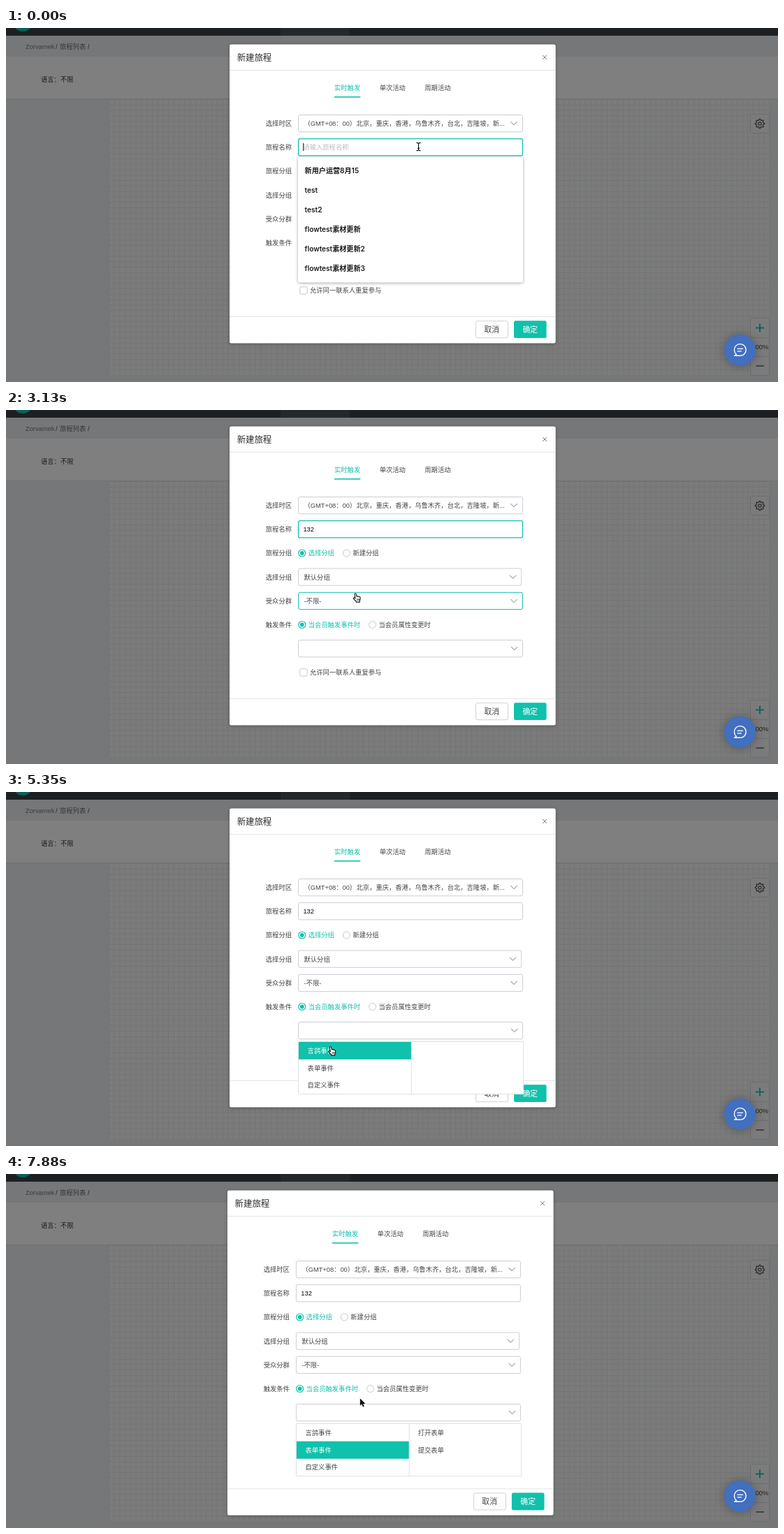
Recreate the animation shown at these times as an HTML page with a canvas. Size 1105x507 px, loop 8000 ms.

```html
<!DOCTYPE html>
<html lang="zh-CN">
<head>
<meta charset="utf-8">
<title>新建旅程</title>
<style>
html, body { margin: 0; width: 100%; height: 100%; overflow: hidden; background: #777879; }
canvas { display: block; width: 100vw; height: 100vh; }
</style>
</head>
<body>
<canvas id="stage"></canvas>
<script>
const W = 1105, H = 507, LOOP = 8000;
const TEAL = '#10c1ab', BORDER = '#c9ced6', INK = '#454545';
const CJK = '"Noto Sans CJK SC", "Noto Sans CJK", "Noto Sans CJK JP", sans-serif';
const UI = '"Liberation Sans", ' + CJK;
const MENU = 'Inter, ' + CJK;

const canvas = document.getElementById('stage');
const ctx = canvas.getContext('2d');

// Steps are [start time, value...]; the last one already begun applies.
const at = (steps, t) => steps.filter(s => s[0] <= t).pop();

const NAME = [[0, ''], [740, '1'], [890, '13'], [2380, '132']];
const CARET = [[0, 1], [290, 0], [740, 1], [1330, 0], [1930, 1], [2980, 0], [3430, 1], [4010, 0]];
const POINTER = [
  [0, beam, 590.5, 170], [2680, beam, 576, 180], [2830, arrow, 546, 212],
  [2980, hand, 512, 239], [3130, hand, 496.5, 262], [3280, hand, 489, 275],
  [3430, arrow, 482, 310], [3570, hand, 469, 334], [3710, hand, 463, 351],
  [3860, hand, 461, 346], [4010, hand, 459.5, 343],
  [5050, hand, 460, 348], [5200, hand, 460.5, 358], [5350, hand, 461, 364],
  [5790, hand, 461, 366], [5940, hand, 462, 374], [6090, hand, 463, 385],
  [6240, hand, 464, 391], [7730, hand, 484, 352], [7880, arrow, 506.3, 321]
];
const ACTIVE = [[0, []], [5200, [0]], [6090, [0, 1]], [6980, [1]]];
const EVENTS = ['言鸽事件', '表单事件', '自定义事件'];
const CHAT_EVENTS = ['关注公众号', '取消关注公众号', '点击公众号菜单', '向公众号发消息', '扫描带参二维码'];
const FORM_EVENTS = ['打开表单', '提交表单'];
const DETAILS = [[0, []], [5790, CHAT_EVENTS], [6980, FORM_EVENTS]];
const HISTORY = ['新用户运营8月15', 'test', 'test2', 'flowtest素材更新', 'flowtest素材更新2', 'flowtest素材更新3'];

function rect(x, y, w, h, color) {
  ctx.fillStyle = color;
  ctx.fillRect(x, y, w, h);
}

function box(x, y, w, h, r, fill, stroke, width = 1) {
  ctx.beginPath();
  ctx.roundRect(x, y, w, h, r);
  if (fill) { ctx.fillStyle = fill; ctx.fill(); }
  if (stroke) { ctx.strokeStyle = stroke; ctx.lineWidth = width; ctx.stroke(); }
}

function disc(x, y, r, fill, stroke, width = 1) {
  ctx.beginPath();
  ctx.arc(x, y, r, 0, Math.PI * 2);
  if (fill) { ctx.fillStyle = fill; ctx.fill(); }
  if (stroke) { ctx.strokeStyle = stroke; ctx.lineWidth = width; ctx.stroke(); }
}

function line(points, color, width = 1) {
  ctx.beginPath();
  points.forEach(([x, y]) => ctx.lineTo(x, y));
  ctx.strokeStyle = color;
  ctx.lineWidth = width;
  ctx.stroke();
}

// y is the vertical middle of the glyphs.
function text(str, x, y, color = INK, size = 9.3, weight = 400, family = UI) {
  ctx.font = `${weight} ${size}px ${family}`;
  ctx.fillStyle = color;
  ctx.fillText(str, x, y + size * 0.37);
}

function shadow(color, blur, dy) {
  ctx.shadowColor = color;
  ctx.shadowBlur = blur * canvas.width / W;
  ctx.shadowOffsetY = dy * canvas.width / W;
}

const noShadow = () => shadow('transparent', 0, 0);

function page() {
  rect(0, 0, W, H, '#757779');
  rect(0, 0, W, 11, '#1d2023');
  rect(393, 0, 99, 11, '#25282b');
  disc(24, -9, 14, '#0a6158');
  rect(0, 41, W, 60, '#7f7f7f');
  rect(0, 101, W, 1, '#6f7172');
  text('Zorvamek', 28, 26.5, '#3c3c3c');
  text('/', 71, 26.5, '#222');
  text('旅程列表', 77, 26.5, '#363636');
  text('/', 117, 26.5, '#222');
  text('语言：不限', 50, 73.5, '#1c1c1c');

  rect(147, 102, 946, 395, '#7b7b7b');
  for (let x = 147; x < 1093; x += 7.75) rect(x, 102, 0.8, 395, '#727373');
  for (let y = 102; y < 497; y += 7.75) rect(147, y, 946, 0.8, '#727373');

  box(1065.5, 123.5, 27, 27, 1, '#7b7b7b', '#6c6d6e');
  gear(1079, 137);
  box(1065.5, 415.5, 27, 82, 1, '#7b7b7b', '#6c6d6e');
  line([[1066, 443.5], [1092, 443.5]], '#6c6d6e');
  line([[1066, 470.5], [1092, 470.5]], '#6c6d6e');
  line([[1073, 429.5], [1085, 429.5]], '#08685d', 2);
  line([[1079, 423.5], [1079, 435.5]], '#08685d', 2);
  text('100%', 1067.5, 456.5, '#222');
  line([[1073.5, 484], [1085, 484]], '#303132', 1.5);
}

function gear(cx, cy) {
  ctx.beginPath();
  for (let i = 0; i < 32; i++) {
    const a = (i - 0.5) * Math.PI / 16, r = i % 4 < 2 ? 6.6 : 5;
    ctx.lineTo(cx + r * Math.cos(a), cy + r * Math.sin(a));
  }
  ctx.closePath();
  ctx.strokeStyle = '#2b2c2d';
  ctx.lineWidth = 1.3;
  ctx.stroke();
  disc(cx, cy, 2.2, null, '#2b2c2d', 1.2);
}

function chatButton() {
  shadow('rgba(0,0,0,.28)', 14, 1);
  disc(1050.5, 461.3, 22.5, '#426fbe');
  noShadow();
  ctx.beginPath();
  ctx.arc(1050.8, 461, 8.4, Math.PI * 0.72, Math.PI * 2.55);
  ctx.lineTo(1042.6, 469.3);
  ctx.closePath();
  ctx.strokeStyle = '#fff';
  ctx.lineWidth = 1.4;
  ctx.lineJoin = 'round';
  ctx.stroke();
  ctx.lineJoin = 'miter';
  line([[1046.6, 459.4], [1055, 459.4]], '#fff', 1.3);
  line([[1046.6, 463], [1053, 463]], '#fff', 1.3);
}

function field(y, { right = 739.5, chevron = 727, color = BORDER, width = 1 } = {}) {
  box(418.5, y, right - 418.5, 24.3, 2.5, '#fff', color, width);
  if (chevron) {
    const my = y + 12;
    line([[chevron - 4.5, my - 2.3], [chevron, my + 2.3], [chevron + 4.5, my - 2.3]], '#747a80');
  }
}

function radio(x, y, label, on) {
  disc(x, y, 5, '#fff', on ? TEAL : '#c3c8cf', on ? 1.2 : 1);
  if (on) disc(x, y, 2.9, TEAL);
  text(label, x + 9, y, on ? TEAL : INK);
}

function dialog(t, grow) {
  shadow('rgba(0,0,0,.3)', 5, 1);
  box(320, 23.5, 466.7, 428 + grow, 2.5, '#fff');
  noShadow();
  text('新建旅程', 330.7, 42.3, '#2b2b2b', 12.4);
  line([[768, 39], [774, 45]], '#7c7c7c');
  line([[774, 39], [768, 45]], '#7c7c7c');
  rect(320, 60, 466.7, 1, '#e4e5e7');

  text('实时触发', 470, 85.5, TEAL);
  text('单次活动', 534.7, 85.5);
  text('周期活动', 599.3, 85.5);
  rect(470, 98, 37.3, 1.6, TEAL);

  ['选择时区', '旅程名称', '旅程分组', '选择分组', '受众分群', '触发条件']
    .forEach((label, i) => text(label, 371.8, 136.7 + i * 34.15));

  field(124.5);
  text('（GMT+08：00）', 426.5, 136.7);
  text('北京，重庆，香港，乌鲁木齐，台北，吉隆坡，新...', 501.5, 136.7);

  const focused = t < 4010;
  field(158.6, { chevron: 0, color: focused ? TEAL : BORDER, width: focused ? 1.3 : 1 });
  const name = at(NAME, t)[1];
  text(name || '请输入旅程名称', 425.4, 170.8, name ? '#000' : '#b9bcc1');
  if (at(CARET, t)[1]) rect(425.2 + ctx.measureText(name).width, 165, 1, 11, '#000');

  radio(423.7, 205, '选择分组', true);
  radio(487.4, 205, '新建分组', false);
  field(227, { right: 737.7, chevron: 725.5, color: t >= 2980 && t < 3130 ? TEAL : BORDER });
  text('默认分组', 426.5, 239.2);
  field(261.3, { color: t >= 3130 && t < 3430 ? TEAL : BORDER });
  text('-不限-', 426.5, 273.3);
  radio(423.7, 307.5, '当会员触发事件时', true);
  radio(524.5, 307.5, '当会员属性变更时', false);
  field(329.5, { chevron: 727.7 });
  box(420.7, 370.7, 10.4, 10.4, 1.5, '#fff', '#c3c8cf');
  text('允许同一联系人重复参与', 435, 376);

  rect(320, 413 + grow, 466.7, 1, '#e4e5e7');
  box(672.5, 419.7 + grow, 46, 24, 2.5, '#fff', '#cfd3d9');
  text('取消', 684.4, 432 + grow, INK, 10.85);
  box(727, 419.3 + grow, 46.6, 24.8, 2.5, TEAL);
  text('确定', 739.4, 432 + grow, '#fff', 10.85);
}

function historyMenu() {
  shadow('rgba(0,0,0,.35)', 4, 1);
  box(418, 185, 322, 179.5, 3, '#fff');
  noShadow();
  HISTORY.forEach((label, i) => text(label, 427.6, 204.6 + i * 27.95, '#1b1b1b', 10.1, 600, MENU));
}

function eventMenu(t) {
  const details = at(DETAILS, t)[1], active = at(ACTIVE, t)[1];
  const rowH = 24.85, rows = Math.max(3, details.length);
  ctx.globalAlpha = t < 4310 ? 0.5 : 1;
  box(418.5, 357.5, 322.2, rows * rowH + 0.7, 1, '#fff', '#dcdfe3');
  EVENTS.forEach((label, i) => {
    const on = active.includes(i), y = 358 + i * rowH;
    if (on) rect(419, y, 161, rowH + 0.1, TEAL);
    text(label, 431.6, y + 12.3, on ? '#fff' : INK, 9.3, on ? 500 : 400);
  });
  details.forEach((label, i) => text(label, 592.8, 370.3 + i * rowH));
  rect(579.8, 358, 1, rows * rowH, '#dcdfe3');
  ctx.globalAlpha = 1;
}

function beam(x, y) {
  const shape = (color, w) => {
    line([[x - 3, y - 5.6], [x - 1, y - 5.4], [x, y - 4.4], [x + 1, y - 5.4], [x + 3, y - 5.6]], color, w);
    line([[x - 3, y + 5.6], [x - 1, y + 5.4], [x, y + 4.4], [x + 1, y + 5.4], [x + 3, y + 5.6]], color, w);
    line([[x, y - 4.6], [x, y + 4.6]], color, w);
    line([[x - 1.5, y + 2.2], [x + 1.5, y + 2.2]], color, w);
  };
  shape('#fff', 2.6);
  shape('#111', 1.2);
}

const HAND = new Path2D('M3.4 8L2.4 2Q2.4.8 3.4.7Q4.4.6 4.7 1.8L5.4 5Q6.5 4.2 7.3 5.2Q8.4 4.6 9.1 5.7' +
  'Q10.4 5.4 10.7 6.9Q11 9.3 9.8 11L9.7 13.1L4.8 13.1L4.6 12Q2.6 10.3.9 8.2Q.4 7 1.7 6.8Q2.5 7 3.4 8Z');
const KNUCKLES = new Path2D('M6 8.2L6.2 11M7.6 8.1L7.7 11M9.1 8L9.1 10.9');
const ARROW = new Path2D('M.5.5V10.8L2.9 8.6L4.6 12.6L6.5 11.8L4.8 7.9H8.1Z');

function hand(x, y) {
  ctx.save();
  ctx.translate(x, y);
  ctx.fillStyle = '#fff';
  ctx.strokeStyle = '#111';
  ctx.lineJoin = 'round';
  ctx.lineWidth = 1.1;
  ctx.fill(HAND);
  ctx.stroke(HAND);
  ctx.lineWidth = 0.7;
  ctx.stroke(KNUCKLES);
  ctx.restore();
}

function arrow(x, y) {
  ctx.save();
  ctx.translate(x, y);
  ctx.strokeStyle = '#fff';
  ctx.lineWidth = 1.5;
  ctx.stroke(ARROW);
  ctx.fillStyle = '#0a0a0a';
  ctx.fill(ARROW);
  ctx.restore();
}

function resize() {
  const dpr = window.devicePixelRatio || 1;
  canvas.width = Math.round(W * dpr);
  canvas.height = Math.round(H * dpr);
}

function draw(t) {
  const scale = canvas.width / W;
  ctx.setTransform(scale, 0, 0, scale, 0, 0);
  page();

  const expanded = t >= 5790;
  ctx.save();
  if (expanded) ctx.translate(-3.1, 0);
  dialog(t, expanded ? 37.3 : 0);
  if (t < 740) historyMenu();
  if (t >= 4160) eventMenu(t);
  ctx.restore();

  chatButton();
  const [, pointer, x, y] = at(POINTER, t);
  pointer(x, y);
}

const start = performance.now();
function tick() {
  draw((performance.now() - start) % LOOP);
  requestAnimationFrame(tick);
}

resize();
window.addEventListener('resize', resize);
tick();
</script>
</body>
</html>
```
